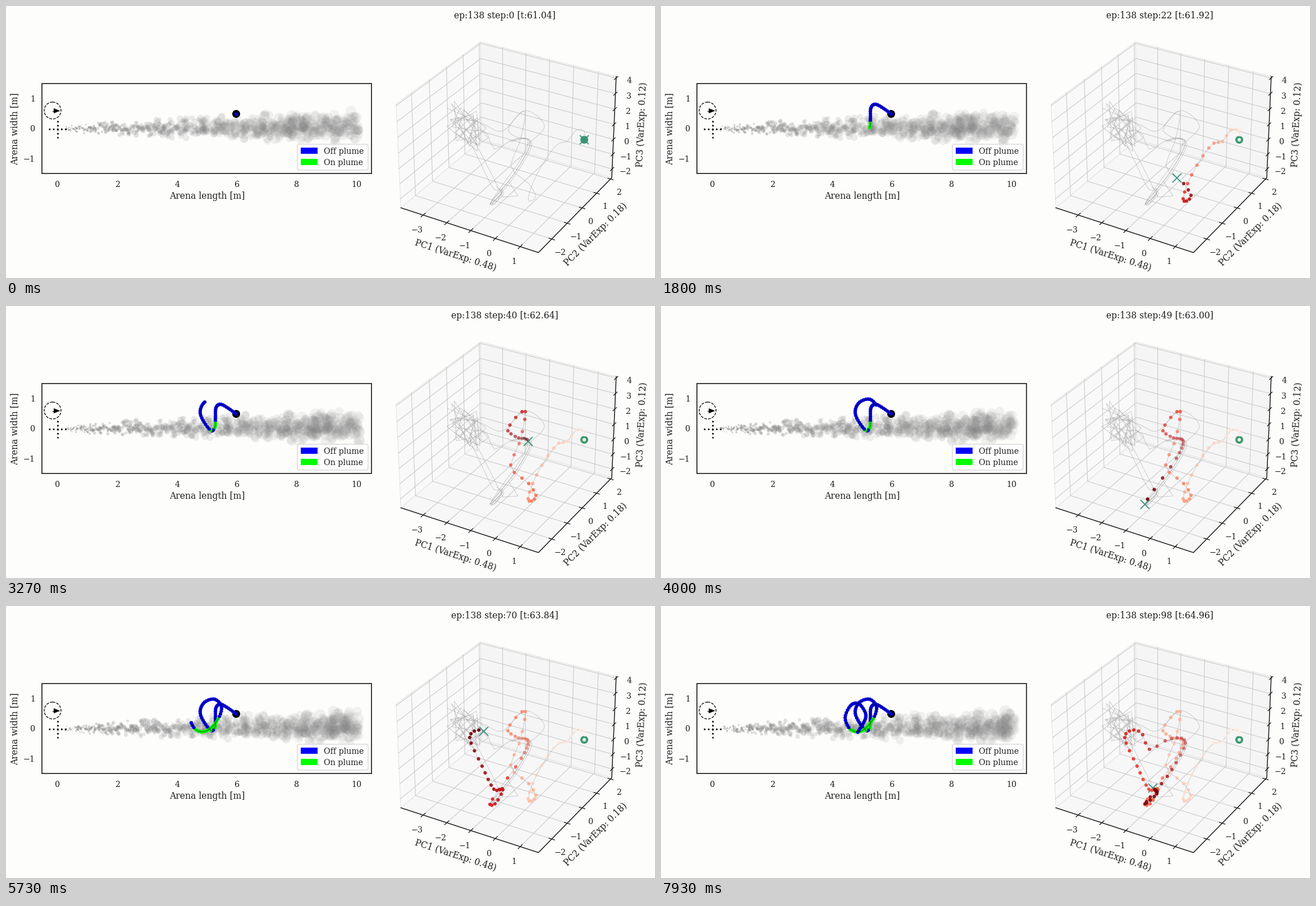
Write a matplotlib script that moves like this. It is 1156 px wide and 484 px high and loops after 8 s.

```python
import numpy as np
import matplotlib.pyplot as plt
from matplotlib.animation import FuncAnimation
from matplotlib.patches import Circle, FancyBboxPatch, Polygon, Rectangle

W, H, DPI = 1156, 484, 100
PX = 72 / DPI  # points per pixel
FRAMES, LOOP = 120, 8000
STEPS = 100
M = 53.3  # pixels per metre
X0, Y0 = 91.5, 218.5
INK = "#1c1c1c"
BIG, SMALL = 15.65 * PX, 14.3 * PX

plt.rcParams["font.family"] = "DejaVu Serif"
rng = np.random.default_rng(138)

fig = plt.figure(figsize=(W / DPI, H / DPI), dpi=DPI, facecolor="#fdfdfc")
ax = fig.add_axes([0, 0, 1, 1])
ax.set_xlim(0, W)
ax.set_ylim(H, 0)
ax.axis("off")


def text(x, y, s, size=SMALL, **kw):
    """Text with the middle of its digits at y."""
    kw = {"ha": "center", "va": "baseline", "color": INK, "zorder": 9, **kw}
    drop = 0.365 * size / PX if kw["va"] == "baseline" else 0
    return ax.text(x, y + drop, s, fontsize=size, **kw)


def line(pts, color=INK, width=1.0, **kw):
    xs, ys = zip(*pts)
    return ax.plot(xs, ys, color=color, lw=width * PX, **kw)[0]


def num(v):
    return str(v).replace("-", "\u2212")


def area(radius):
    return (2 * np.asarray(radius) * PX) ** 2


def glide(keys):
    """Smooth path through (step, x, y) keys, one point per step."""
    keys = np.array(keys, float)
    t, p = keys[:, 0], keys[:, 1:]
    v = np.gradient(p, t, axis=0)
    k = np.arange(t[0], t[-1] + 1)
    i = np.clip(np.searchsorted(t, k, "right") - 1, 0, len(t) - 2)
    h = (t[i + 1] - t[i])[:, None]
    u = (k - t[i])[:, None] / h
    return ((1 + 2 * u) * (1 - u) ** 2 * p[i] + u * (1 - u) ** 2 * h * v[i]
            + u * u * (3 - 2 * u) * p[i + 1] - u * u * (1 - u) * h * v[i + 1])


# ---------- arena ----------
def arena():
    ax.add_patch(Rectangle((64, 138), 587, 160, fill=False,
                           ec=INK, lw=1.7 * PX, zorder=6))
    for v in range(0, 11, 2):
        text(X0 + v * M, 317, num(v))
    for v in (-1, 0, 1):
        text(52, Y0 - v * M - 0.5, num(v), ha="right")
    text(358.5, 337, "Arena length [m]", BIG)
    text(16, 219, "Arena width [m]", BIG, rotation=90, va="center")

    dots = dict(ls=(0, (1, 1.65)), zorder=3)
    line([(76, 219), (108, 219)], "black", 2.7, **dots)
    line([(91.5, 204), (91.5, 235)], "black", 2.7, **dots)
    ax.add_patch(Circle((83, 186), 15, fill=False, ec="black", lw=1.3 * PX,
                        ls=(0, (3.7, 1.6)), zorder=3))
    line([(83, 186.5), (88, 186.5)], "black", 1.2, zorder=3)
    ax.add_patch(Polygon([(85, 182), (96.5, 186.5), (85, 191)],
                         fc="black", zorder=3))

    ax.add_patch(FancyBboxPatch((522, 249), 120, 40,
                                boxstyle="round,pad=3,rounding_size=3",
                                fc="white", ec="#cccccc", alpha=0.8,
                                lw=1.3 * PX, zorder=7))
    for y, color, name in ((258, "#0000ff", "Off plume"),
                           (278, "#00ff00", "On plume")):
        ax.add_patch(Rectangle((525, y - 6), 30, 11, fc=color, zorder=8))
        text(566, y, name, ha="left")


# ---------- 3D box ----------
HALF = np.array([0.5714, 0.5714, 0.4286])
MID = np.array([-1.12, -0.37, 0.75])
SPAN = np.array([2.84, 2.46, 3.35])
el, az = np.radians(30), np.radians(-60)
RIGHT = np.array([-np.sin(az), np.cos(az), 0])
UP = np.array([-np.sin(el) * np.cos(az), -np.sin(el) * np.sin(az), np.cos(el)])
EYE = np.array([np.cos(el) * np.cos(az), np.cos(el) * np.sin(az), np.sin(el)])


def project(*p):
    """Box coordinates in -1..1 to stage pixels."""
    q = np.array(p) * HALF
    f = 2457 / (10 - q @ EYE)
    return 894.5 + f * (q @ RIGHT), 242.6 - f * (q @ UP)


def on_axis(axis, v):
    return (v - MID[axis]) / SPAN[axis]


def box():
    panes = (
        ("#f9f9f9", [(-1, -1, -1), (-1, 1, -1), (-1, 1, 1), (-1, -1, 1)]),
        ("#f5f5f5", [(-1, 1, -1), (1, 1, -1), (1, 1, 1), (-1, 1, 1)]),
        ("#f7f7f7", [(-1, -1, -1), (1, -1, -1), (1, 1, -1), (-1, 1, -1)]),
    )
    for color, corners in panes:
        ax.add_patch(Polygon([project(*c) for c in corners], fc=color,
                             ec="#e2e2e2", lw=1 * PX, zorder=1))

    def grid(*pts):
        line([project(*p) for p in pts], "#cacaca", 1.1, zorder=1.5)

    def tick(a, b, label, dx, dy):
        a, b = np.array(project(*a)), np.array(project(*b))
        line([a, b], INK, 1.3, zorder=5)
        x, y = (a + b) / 2
        text(x + dx, y + dy, label)

    for v in range(-3, 2):
        t = on_axis(0, v)
        grid((t, -1, -1), (t, 1, -1), (t, 1, 1))
        tick((t, -1.05, -1), (t, -0.95, -1), num(v), -11, 26)
    for v in range(-2, 3):
        t = on_axis(1, v)
        grid((1, t, -1), (-1, t, -1), (-1, t, 1))
        tick((0.96, t, -1), (1.04, t, -1), num(v), 15, 23)
    for v in range(-2, 5):
        t = on_axis(2, v)
        grid((1, 1, t), (-1, 1, t), (-1, -1, t))
        tick((1, 0.95, t), (1, 1.05, t), num(v), 23.5, 3.5)

    ends = [(-1, -1, -1), (1, -1, -1), (1, 1, -1), (1, 1, 1)]
    line([project(*e) for e in ends], INK, 1.5, zorder=5)
    for x, y, turn, s in ((801, 444, -17.8, "PC1 (VarExp: 0.48)"),
                          (1050, 407, 45, "PC2 (VarExp: 0.18)"),
                          (1133, 211, 87.5, "PC3 (VarExp: 0.12)")):
        text(x, y, s, BIG, rotation=turn, va="center", rotation_mode="anchor")


# ---------- plume ----------
BIRTH = np.concatenate([rng.uniform(-510, 100, 900), rng.normal(-388, 30, 50)])
SIDE = np.clip(rng.normal(0, 1, BIRTH.size), -2.1, 2.1)
PHASE = rng.uniform(0, 2 * np.pi, BIRTH.size)
GROWTH = rng.uniform(0.7, 1.15, BIRTH.size)
puffs = ax.scatter([], [], linewidths=0, zorder=2)


def draw_plume(step):
    age = step - BIRTH
    dist = age * 0.02
    live = (dist > 0.25) & (dist < 10.1)
    d = dist[live]
    sway = SIDE[live] + 0.2 * np.sin(age[live] * 0.05 + PHASE[live])
    y = 0.07 * d ** 0.53 * sway + 0.006 * d
    rgba = np.full((d.size, 4), 0.5)
    rgba[:, 3] = 0.09 + 0.36 * np.exp(-d / 2.4)
    puffs.set_offsets(np.c_[X0 + d * M, Y0 - y * M])
    puffs.set_sizes(area((0.3 + 1.75 * d ** 0.75) * GROWTH[live]))
    puffs.set_facecolors(rgba)


# ---------- flight path ----------
FLIGHT = glide([
    (0, 410, 192), (4, 396, 182), (8, 383, 175), (13, 374, 181),
    (18, 373, 200), (22, 372, 216), (25, 367, 222), (30, 353, 207),
    (34, 346, 191), (40, 354, 171), (45, 372, 166), (49, 383, 176),
    (58, 369, 213), (61, 358, 222), (67, 337, 219), (72, 328, 199),
    (77, 337, 178), (84, 355, 176), (88, 364, 190), (99, 349, 228),
])
k = np.arange(STEPS)
on_plume = ((k >= 20) & (k <= 23)) | (k == 26) | ((k >= 55) & (k <= 67))
TRAIL = np.where(on_plume, "#00f000", "#0000dc")

ax.add_patch(Circle(FLIGHT[0], 7, fc="black", zorder=3))
trail = ax.scatter([], [], s=area(3.2), linewidths=0, zorder=4)
thread = line([(0, 0)], "black", 0.9, alpha=0.55, zorder=4.5)

# ---------- state path ----------
STATE = glide([
    (0, 1030, 238), (2, 1030, 222), (4, 1015, 221), (6, 1000, 241),
    (8, 985, 244), (13, 938, 316), (15, 930, 343), (17, 936, 347),
    (19, 944, 337), (21, 931, 316), (24, 899, 283), (26, 914, 245),
    (29, 925, 188), (33, 894, 222), (35, 907, 232), (40, 930, 241),
    (44, 918, 271), (49, 862, 353), (51, 871, 352), (54, 885, 327),
    (58, 869, 326), (62, 848, 285), (66, 826, 234), (71, 858, 229),
    (73, 870, 255), (75, 898, 240), (80, 934, 244), (84, 910, 291),
    (90, 862, 352), (94, 883, 334), (99, 874, 322),
])
# dots fade towards the far side of the box
FAR = ((STATE - (930, 250)) ** 2).sum(axis=1)
SHADE = 0.95 - 0.45 * np.exp(-FAR / 3200)


def ghosts():
    thin = dict(color="#a2a2a2", width=0.7, alpha=0.7, zorder=2)
    line(STATE, **thin)
    for _ in range(2):  # later laps near the same loop
        line(STATE[75:97] + rng.normal(0, 2, 2), **thin)
    turn = np.cumsum(rng.normal(2.0, 0.6, 34))
    reach = rng.uniform(0.5, 1.1, turn.size)
    y = 214 + 43 * reach * np.sin(turn)
    x = 822 + 34 * reach * np.cos(turn) + 0.3 * (y - 214)
    line(zip(x, y), **thin)
    line(glide([(0, 786, 182), (10, 850, 210), (20, 885, 222), (30, 924, 186),
                (40, 959, 214), (50, 925, 250)]), **thin)
    line(glide([(0, 826, 225), (10, 850, 270), (20, 885, 340)]), **thin)
    line([(885, 340), (912, 338), (895, 312)], **thin)


ax.add_patch(Circle(STATE[0], 7, fc="#3a9a70", zorder=3))
states = ax.scatter([], [], s=area(3.1), linewidths=0, zorder=4)
cross = ax.plot([], [], "x", color="#38907e", ms=16 * PX, mew=1.8 * PX,
                zorder=3.5)[0]
title = text(888.5, 16, "", BIG)

arena()
box()
ghosts()


def update(frame):
    step = max(0, (5 * frame - 1) // 6)
    draw_plume(step)

    trail.set_offsets(FLIGHT[:step + 1])
    trail.set_facecolors(list(TRAIL[:step + 1]))
    thread.set_data(*FLIGHT[:step + 1].T)

    rgba = plt.cm.Reds(np.arange(step) / max(step, 1))
    rgba[:, 3] = SHADE[:step]
    states.set_offsets(STATE[:step])
    states.set_facecolors(rgba)
    cross.set_data(*STATE[step:step + 1].T)

    title.set_text(f"ep:138 step:{step} [t:{61.04 + 0.04 * step:.2f}]")
    return puffs, trail, thread, states, cross, title


anim = FuncAnimation(fig, update, frames=FRAMES, interval=LOOP / FRAMES,
                     repeat=True, repeat_delay=0, blit=False)
plt.show()
```
